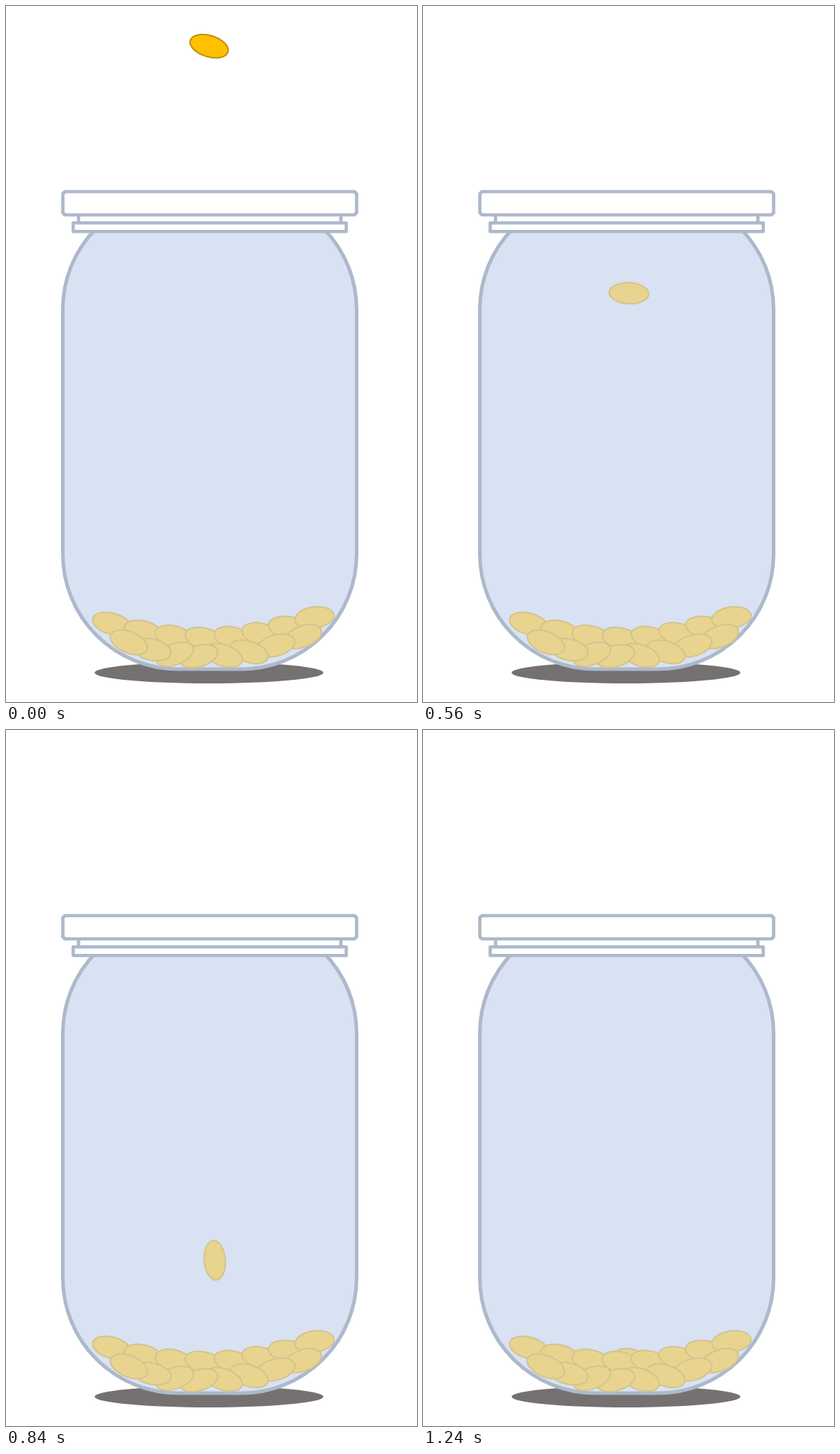
Recreate the animation shown at these times as an HTML page. Size 575 by 973 pixels, loop 1.28 s.

```html
<!DOCTYPE html>
<html lang="en">
<head>
<meta charset="utf-8">
<title>Coin jar</title>
<style>
  html, body { margin: 0; width: 100%; height: 100%; overflow: hidden; background: #fff; }
  svg { display: block; width: 100vw; height: 100vh; }
  .glass { fill: #d9e2f3; stroke: #adb9ca; stroke-width: 5; }
  .lid { fill: #fff; stroke: #adb9ca; stroke-width: 4.6; stroke-linejoin: round; }
  .coin { fill: #e8d48f; stroke: #d3c38e; stroke-width: 2; }
  .gold { fill: #ffc000; stroke: #bc8c0c; }
</style>
</head>
<body>
<svg viewBox="0 0 575 973">
  <ellipse cx="284" cy="932" rx="160" ry="15" fill="#767171"/>
  <rect class="glass" x="79.5" y="263" width="411" height="664" rx="161"/>
  <ellipse id="coin" class="coin" rx="27.6" ry="14.8"/>
  <g id="pile"></g>
  <g class="lid">
    <rect x="101.5" y="290" width="367" height="16"/>
    <rect x="94" y="303.3" width="382" height="12"/>
    <path d="M82.5 259.5H487.5L490.5 262.5V289L487.5 292H82.5L79.5 289V262.5Z"/>
  </g>
</svg>
<script>
const LOOP = 1280, STEP = 40, ROW = 8;
const coin = document.getElementById('coin');
const pile = document.getElementById('pile');

const clamp = v => Math.min(1, Math.max(0, v));

function place(el, x, y, tilt) {
  el.setAttribute('transform', `translate(${x} ${y}) rotate(${tilt})`);
}

// a sagging row of coins; bow shifts the inner coins sideways
function addRow({ left, right, bow, low, sag, tilt, reverse }) {
  for (let n = 0; n < ROW; n++) {
    const i = reverse ? ROW - 1 - n : n;
    const u = i / (ROW - 1);
    const el = coin.cloneNode();
    el.removeAttribute('id');
    const x = left + (right - left) * u + bow * Math.sin(Math.PI * u);
    place(el, x, low - sag * (i - 3.2) ** 2, tilt(i, u));
    pile.appendChild(el);
  }
}

addRow({ left: 148, right: 431.5, bow: 8.5, low: 884.5, sag: 2.05,
  tilt: (i, u) => 15 - 23 * u ** 8 });
addRow({ left: 172, right: 415, bow: -7, low: 909, sag: 1.9, reverse: true,
  tilt: i => 25 * Math.cos(2 * Math.PI * (i - 0.3) / 4.2) });

// symmetric cubic Bezier ease with handles at a and 1 - a
function ease(x, a) {
  let lo = 0, hi = 1, s = 0.5;
  for (let k = 0; k < 24; k++) {
    s = (lo + hi) / 2;
    const bx = 3 * a * s * (1 - s) ** 2 + 3 * (1 - a) * s * s * (1 - s) + s ** 3;
    if (bx < x) lo = s; else hi = s;
  }
  return s * s * (3 - 2 * s);
}

function draw(ms) {
  const t = Math.floor((ms % LOOP) / STEP) * STEP;
  const p = ease(clamp((t - 45) / 1130), 0.46);
  const y = 56.2 + 824.8 * p;
  place(coin, 284.2 + 9.5 * p, y, 17 + 360 * clamp(t / 1218));
  coin.classList.toggle('gold', y < 287);
}

const start = performance.now();
function tick() {
  draw(performance.now() - start);
  requestAnimationFrame(tick);
}
tick();
</script>
</body>
</html>
```
